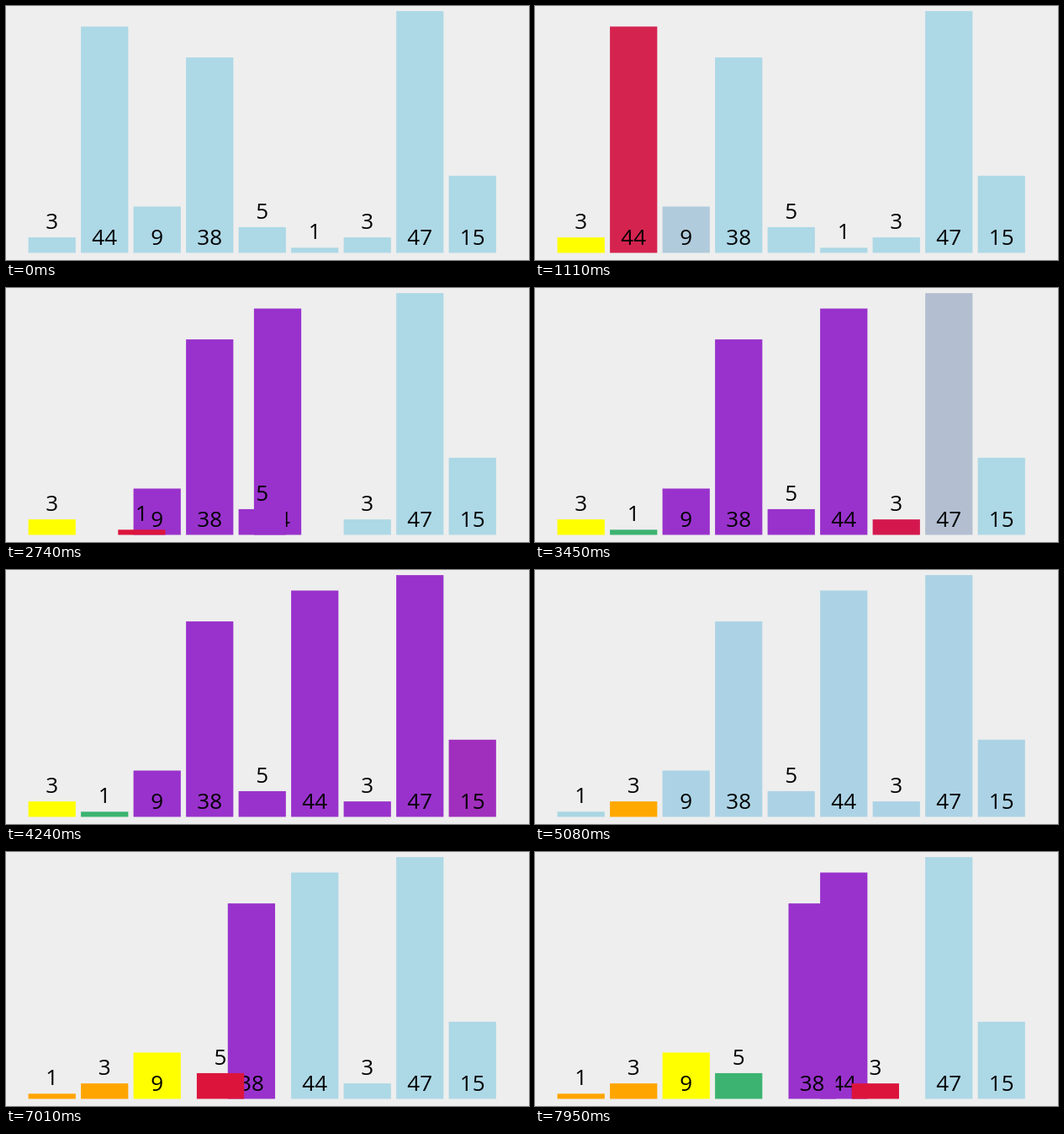
These frames come from a looping animation (622x302 px, 8 s). An HTML page:

```html
<!DOCTYPE html>
<html lang="en">
<head>
<meta charset="utf-8">
<title>Quick sort</title>
<style>
html, body { margin: 0; width: 100%; height: 100%; overflow: hidden; background: #eee; }
svg { display: block; width: 622px; height: 302px; }
text { font: 26px "Open Sans", "Noto Sans", sans-serif; text-anchor: middle; }
</style>
</head>
<body>
<svg id="stage" viewBox="0 0 622 302"></svg>
<script>
const LOOP = 8000, FADE = 250, MOVE = 280;
const LEFT = 26.6, PITCH = 62.5, WIDTH = 56.25, BASE = 293.5, UNIT = 6.115;
const COLORS = {
  idle: [173, 216, 230],
  pivot: [255, 255, 0],
  look: [220, 20, 60],
  high: [153, 50, 204],
  low: [60, 179, 113],
  done: [255, 165, 0]
};
const values = [3, 44, 9, 38, 5, 1, 3, 47, 15];

// [start ms, { bar: colour name, or the slot it moves to }]
const steps = [
  [430, { 0: "pivot" }],
  [863, { 1: "look" }],
  [1048, { 1: "high", 2: "look" }],
  [1400, { 2: "high", 3: "look" }],
  [1885, { 3: "high", 4: "look" }],
  [2355, { 4: "high", 5: "look" }],
  [2560, { 1: 5, 5: 1 }],
  [2890, { 5: "low", 6: "look" }],
  [3372, { 6: "high", 7: "look" }],
  [3840, { 7: "high", 8: "look" }],
  [4065, { 8: "high" }],
  [4340, { 0: 1, 5: 0 }],
  [4880, { 0: "done", 1: "idle", 2: "idle", 3: "idle", 4: "idle",
           5: "idle", 6: "idle", 7: "idle", 8: "idle" }],
  [5400, { 5: "done" }],
  [5640, { 2: "pivot" }],
  [5890, { 3: "look" }],
  [6365, { 3: "high", 4: "look" }],
  [6835, { 3: 4, 4: 3 }],
  [7175, { 4: "low", 1: "look" }],
  [7405, { 1: "high", 6: "look" }],
  [7848, { 3: 6, 6: 4 }]
];

const stage = document.getElementById("stage");

function add(parent, tag, attrs) {
  const node = document.createElementNS("http://www.w3.org/2000/svg", tag);
  for (const key in attrs) node.setAttribute(key, attrs[key]);
  return parent.appendChild(node);
}

const bars = values.map((value, id) => {
  const height = value * UNIT, top = BASE - height;
  const group = add(stage, "g", {});
  const rect = add(group, "rect", { y: top, width: WIDTH, height });
  const label = add(group, "text", { x: WIDTH / 2, y: (height < 40 ? top : BASE) - 10 });
  label.textContent = value;

  const fades = [], moves = [];
  for (const [start, changes] of steps) {
    const to = changes[id];
    if (typeof to === "string") fades.push({ start, to: COLORS[to] });
    else if (to !== undefined) moves.push({ start, to: [to] });
  }
  return { id, group, rect, fades, moves };
});

const ease = p => p < 0.5 ? 4 * p ** 3 : 1 - 4 * (1 - p) ** 3;

// A change still running when the next one begins is cut off there.
function follow(from, track, span, time) {
  return track.reduce((now, { start, to }, i) => {
    const end = i + 1 < track.length ? Math.min(time, track[i + 1].start) : time;
    const p = ease(Math.max(0, Math.min(1, (end - start) / span)));
    return now.map((v, k) => v + (to[k] - v) * p);
  }, from);
}

function draw(time) {
  for (const { id, group, rect, fades, moves } of bars) {
    const [slot] = follow([id], moves, MOVE, time);
    const rgb = follow(COLORS.idle, fades, FADE, time).map(Math.round);
    group.setAttribute("transform", `translate(${LEFT + PITCH * slot} 0)`);
    rect.setAttribute("fill", `rgb(${rgb})`);
  }
}

const begin = performance.now();
function tick() {
  draw((performance.now() - begin) % LOOP);
  requestAnimationFrame(tick);
}
draw(0);
requestAnimationFrame(tick);
</script>
</body>
</html>
```
